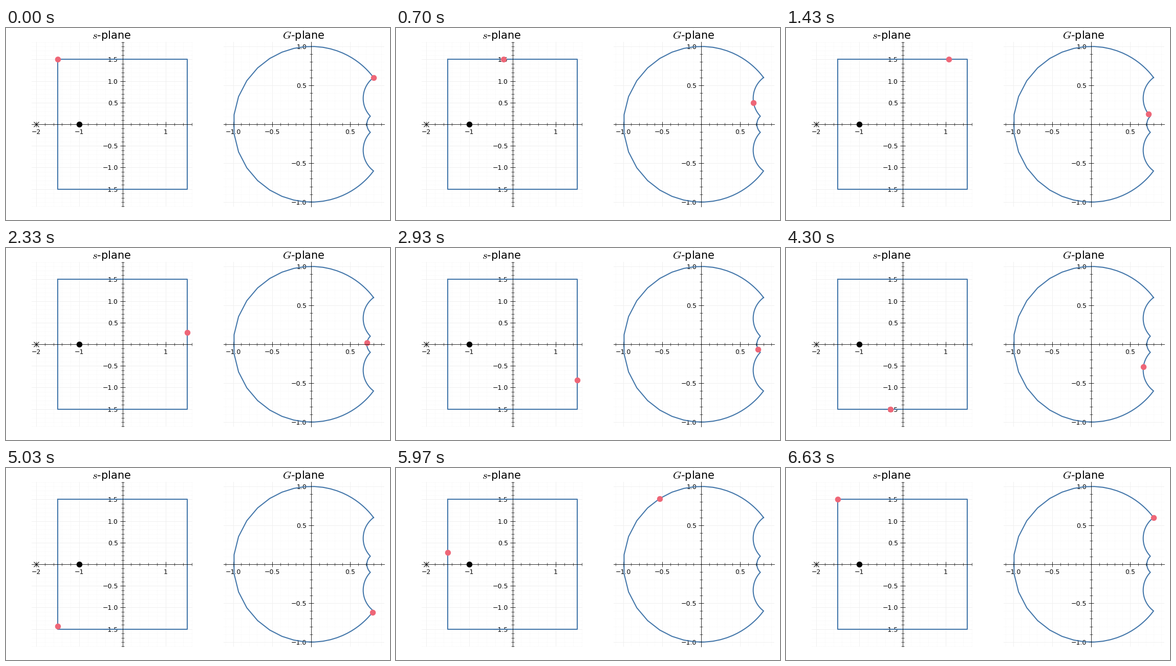
A matplotlib script for the animation above (6.66 s loop, 750 by 375 pixels).

```python
import numpy as np
import matplotlib.pyplot as plt
from matplotlib.animation import FuncAnimation
from matplotlib.ticker import AutoMinorLocator, FixedLocator, FormatStrFormatter

W, H, DPI = 750, 375, 75
BLUE, RED = "#4477aa", "#ee6677"
SIDE = 50

plt.rcParams.update({
    "font.family": "DejaVu Sans",
    "font.size": 12,
    "mathtext.fontset": "cm",
})


def square_path(r, n):
    """Clockwise square from the top-left corner, n points per side."""
    u = np.linspace(-r, r, n)
    return np.concatenate([u + 1j * r, r - 1j * u, -u - 1j * r, -r + 1j * u])


def transfer(s):
    return (s + 1) / (s + 2)


def make_plane(fig, left, right, zero_x, unit, xticks, yticks, xfmt, title):
    """Axes with centred spines, placed in pixels measured from the top left."""
    top, bottom, zero_y = 27, 349, 188
    ax = fig.add_axes([left / W, 1 - bottom / H, (right - left) / W, (bottom - top) / H])
    ax.set_xlim((left - zero_x) / unit, (right - zero_x) / unit)
    ax.set_ylim((zero_y - bottom) / unit, (zero_y - top) / unit)
    ax.spines[["left", "bottom"]].set_position("zero")
    ax.spines[["right", "top"]].set_visible(False)
    for axis, ticks, fmt in ((ax.xaxis, xticks, xfmt), (ax.yaxis, yticks, "%.1f")):
        axis.set_major_locator(FixedLocator(ticks))
        axis.set_minor_locator(AutoMinorLocator(5))
        formatter = FormatStrFormatter(fmt)
        axis.set_major_formatter(lambda v, p, f=formatter: f(v, p).replace("-", "\u2212"))
    ax.tick_params(which="major", direction="inout", length=10)
    ax.tick_params(which="minor", direction="inout", length=5)
    ax.grid(which="major", color="#eeeeee", lw=0.8)
    ax.grid(which="minor", color="#eeeeee", lw=0.6, ls=":")
    ax.set_title(title, fontsize=20)
    return ax


def freeze(fig):
    """Render the static parts once; only spines stay live, above the dots."""
    for ax in fig.axes:
        ax.spines[["left", "bottom"]].set_visible(False)
    fig.canvas.draw()
    backdrop = np.array(fig.canvas.buffer_rgba())
    for ax in fig.axes:
        for line in list(ax.lines):
            line.remove()
        for part in (ax.xaxis, ax.yaxis, ax.title, ax.patch):
            part.set_visible(False)
        ax.spines[["left", "bottom"]].set_visible(True)
    fig.figimage(backdrop, origin="upper", zorder=-1)


s = square_path(1.5, SIDE)
g = transfer(s)

fig = plt.figure(figsize=(W / DPI, H / DPI), dpi=DPI, facecolor="white")
halves = [-1.5, -1, -0.5, 0.5, 1, 1.5]
s_ax = make_plane(fig, 49.5, 363.5, 227.6, 84.43, [-2, -1, 1], halves, "%d", "$s$-plane")
g_ax = make_plane(fig, 425, 738.7, 596.3, 152, [-1, -0.5, 0.5],
                  [-1, -0.5, 0.5, 1], "%.1f", "$G$-plane")

planes = ((s_ax, s), (g_ax, g))
for ax, path in planes:
    ax.plot(path.real, path.imag, color=BLUE, lw=2)
s_ax.plot(-2, 0, "x", color="black", ms=10)
s_ax.plot(-1, 0, "o", color="black", ms=10)
freeze(fig)

dots = [ax.plot([], [], "o", color=RED, ms=10)[0] for ax, _ in planes]


def update(i):
    for dot, (_, path) in zip(dots, planes):
        dot.set_data([path[i].real], [path[i].imag])
    return dots


anim = FuncAnimation(fig, update, frames=len(s), interval=33.3,
                     repeat=True, repeat_delay=0, blit=False)
plt.show()
```
